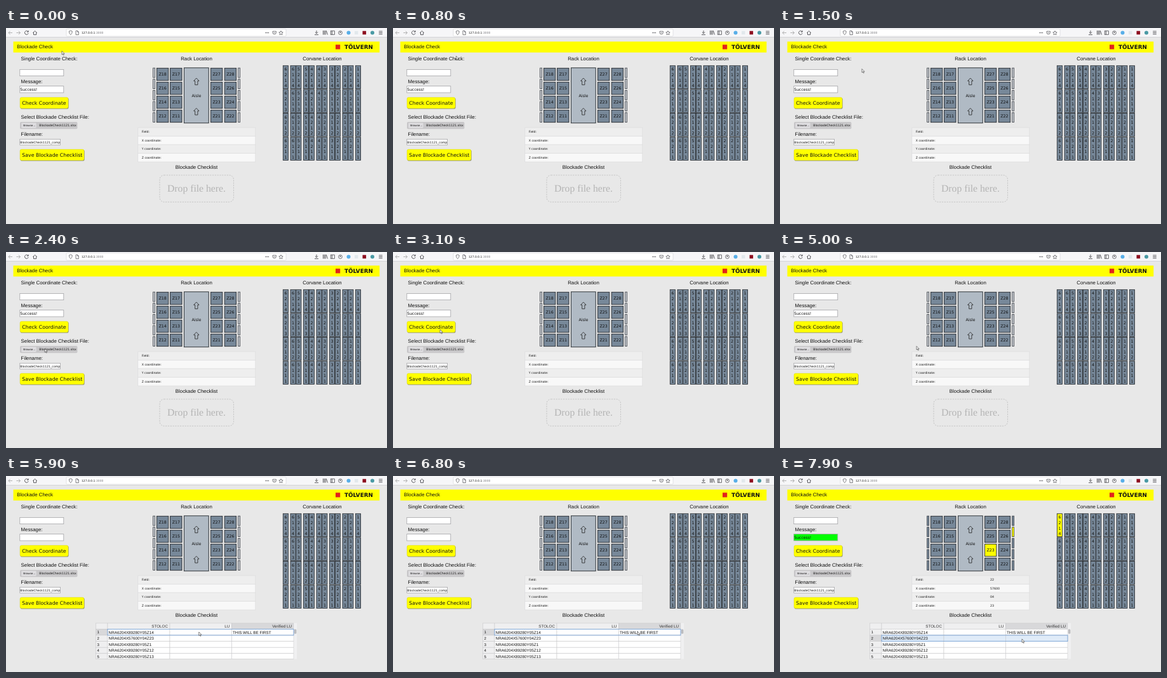
These frames come from a looping animation (600x309 px, 8000 ms). An HTML page:

```html
<!DOCTYPE html>
<html lang="en">
<head>
<meta charset="utf-8">
<title>Blockade Check</title>
<style>
html, body { margin: 0; width: 100%; height: 100%; overflow: hidden; background: #e8e8e8; }
svg { display: block; width: 600px; height: 309px; }
text { text-rendering: geometricPrecision; white-space: pre; }
.a { font-family: "Liberation Sans", Arial, sans-serif; }
.d { font-family: "DejaVu Sans", Verdana, sans-serif; }
.s { font-family: "Liberation Serif", Times, serif; }
</style>
</head>
<body>
<svg id="stage" viewBox="0 0 600 309"></svg>
<script>
const stage = document.getElementById('stage');
const LOOP = 8000, TABLE_AT = 5900, PICK_AT = 7100;
const SLATE = '#778899', YELLOW = '#ffff00', INK = '#20252a', PALE = '#c6cacf';

function add(tag, attrs, parent = stage) {
  const el = document.createElementNS('http://www.w3.org/2000/svg', tag);
  for (const k in attrs) el.setAttribute(k, attrs[k]);
  return parent.appendChild(el);
}
const group = () => add('g', {});
const rect = (x, y, width, height, fill, more = {}, parent) =>
  add('rect', { x, y, width, height, fill, ...more }, parent);
const path = (d, stroke, more = {}, parent) =>
  add('path', { d, stroke, fill: 'none', 'stroke-width': 0.9, ...more }, parent);
const dot = (cx, cy, r, fill, more = {}) => add('circle', { cx, cy, r, fill, ...more });
function text(str, x, y, size, font = 'a', more = {}, parent) {
  const el = add('text', { x, y, 'font-size': size, class: font, fill: '#111', ...more }, parent);
  el.textContent = str;
  return el;
}
const mid = { 'text-anchor': 'middle' }, end = { 'text-anchor': 'end' };
const show = (el, on) => el.setAttribute('visibility', on ? 'visible' : 'hidden');

function toolbar() {
  const c = '#4a4a4f', thin = { 'stroke-width': 0.7 };
  rect(0, 0, 600, 14.5, '#f6f6f8');
  rect(0, 14.2, 600, 0.8, '#cfcfd2');
  rect(95, 1.5, 346, 11.5, '#fff', { rx: 1.2, stroke: '#d2d2d5', 'stroke-width': 0.6 });
  path('M10 7.5H4M6.6 4.8L3.9 7.5L6.6 10.2', '#aaa');
  path('M16.4 7.5h6M19.8 4.8l2.7 2.7l-2.7 2.7', '#aaa');
  path('M34.8 5.8A2.9 2.9 0 1 0 35.2 8.2M35.2 4v2.2H33', c);
  path('M42.3 7.7L45.6 4.6L48.9 7.7M43.5 7.2v3.4h4.2V7.2', c);
  path('M99.4 5l2.4-.9l2.4.9c0 3-.8 4.5-2.4 5.6c-1.6-1.1-2.4-2.6-2.4-5.6z', c, thin);
  path('M110 4.4h2.8l1.6 1.6v4.6H110zM112.6 4.6v1.6h1.6', c, thin);
  text('127.0.0.1', 119, 9.3, 4.5, 'd');
  text(':3000', 140.4, 9.3, 4.5, 'd', { fill: '#77777c' });
  for (let i = 0; i < 3; i++) dot(409 + i * 2.2, 7.5, 0.75, c);
  path('M420 5.2h5.4v2a2.7 2.7 0 0 1-5.4 0zM421.4 6.8l1.3 1.3l1.3-1.3', c, thin);
  path('M433 4.5l1 2.1l2.2.3l-1.6 1.5l.4 2.3l-2-1.1l-2 1.1l.4-2.3l-1.6-1.5l2.2-.3z', c, thin);
  path('M489 4v4.6M486.9 6.6l2.1 2.1l2.1-2.1M486 10.6h6', c);
  path('M499.5 4v6.6M501.4 4v6.6M503.2 4v6.6M504.4 4.3l2 6.3', c);
  rect(511.3, 4.7, 6, 5.6, 'none', { stroke: c, 'stroke-width': 0.8 });
  path('M513.4 4.7v5.6', c);
  dot(526.5, 7.5, 2.9, 'none', { stroke: c, 'stroke-width': 0.8 });
  dot(526.5, 6.8, 1, c);
  dot(539.5, 7.5, 3, '#58aee8');
  rect(549, 4.8, 5.4, 5.4, '#e2e8ec');
  rect(561.5, 4.7, 5.6, 5.6, '#8e1020');
  dot(577, 7.5, 3, '#4a9aa4');
  path('M587.2 5.2h5.6M587.2 7.5h5.6M587.2 9.8h5.6', c);
}

function header() {
  rect(11.5, 21.4, 576.8, 17.2, YELLOW);
  text('Blockade Check', 17.3, 32.2, 7.85);
  rect(519, 26.3, 7.2, 7.2, '#e2231a');
  text('TÖLVERN', 533, 33, 8.8, 'd', { 'font-weight': 'bold' });
  text('Single Coordinate Check:', 23.5, 51, 7.85);
  text('Rack Location', 300, 51, 7.85, 'a', mid);
  text('Corvane Location', 498, 51, 7.85, 'a', mid);
  text('Blockade Checklist', 300, 222.4, 7.85, 'a', mid);
}

const input = (y, w, h) => rect(21.8, y, w, h, '#fff', { stroke: '#a5a5a8', 'stroke-width': 0.8 });
function button(label, y, w) {
  rect(22.6, y + 0.7, w, 17.5, '#8a8a70', { rx: 2.6 });
  rect(22, y, w, 17.4, YELLOW, { rx: 2.6, stroke: '#c9c92c', 'stroke-width': 0.4 });
  text(label, 25.3, y + 11.8, 7.8, 'd');
}

function form() {
  input(65.4, 69, 10.2);
  text('Message:', 23.5, 86.5, 7.85);
  const field = input(91.6, 69, 10.4);
  const note = text('Success!', 22.3, 99, 6.1, 'd');
  button('Check Coordinate', 109.3, 76);
  text('Select Blockade Checklist File:', 23.6, 142.8, 7.85);
  rect(22, 148, 90.5, 11.2, '#c9c8ca', { rx: 2 });
  rect(24, 149.2, 24, 8.8, '#dedde0', { rx: 1, stroke: '#bcbcbe', 'stroke-width': 0.4 });
  text('Browse...', 27.3, 155.2, 4.15, 'd');
  text('BlockadeCheck1121.xlsx', 52.2, 155.3, 4.72, 'd');
  text('Filename:', 23.6, 169.8, 7.85);
  input(175.3, 63.8, 9);
  const clip = add('clipPath', { id: 'name' });
  rect(22, 175, 63.2, 10, '#000', {}, clip);
  text('BlockadeCheck1121_comp', 22.3, 181.6, 4.7, 'd', { 'clip-path': 'url(#name)' });
  button('Save Blockade Checklist', 191.3, 101);
  return { field, note };
}

function rack() {
  const edge = { stroke: INK, 'stroke-width': 0.9 };
  const names = [[18, 17, 27, 28], [16, 15, 25, 26], [14, 13, 23, 24], [12, 11, 21, 22]];
  const bars = [], cells = {};
  for (const x of [231.6, 365.6])
    for (let i = 0; i < 5; i++)
      bars.push(rect(x, 63.1 + i * 17.6, 3, 15, PALE, { stroke: '#3c4046', 'stroke-width': 0.8 }));
  names.forEach((row, r) => row.forEach((n, c) => {
    const x = [237.4, 258.6, 322.4, 344.2][c], y = 63.3 + r * 22;
    cells[n] = rect(x, y, 18.4, 19.4, SLATE, edge);
    text('Z' + n, x + 9.2, y + 12, 6.3, 'd', mid);
  }));
  rect(280.4, 62.8, 38.8, 87, '#b0bac4', edge);
  text('Aisle', 300, 108.8, 6.3, 'd', mid);
  for (const y of [79, 126.4])
    path(`M299.8 ${y}l4.2 4.4h-2.1v6.2h-4.2v-6.2h-2.1z`, '#222', { 'stroke-width': 0.8 });
  return { bars, bar: bars[6], cell: cells[23] };
}

// Lanes stand in close pairs, with a lone one at either side.
function lanes() {
  let first;
  for (let c = 0; c < 12; c++)
    for (let g = 0; g < 4; g++) {
      const x = 436.3 + (c >> 1) * 20.5 + c % 2 * 11.7, y = 59.3 + g * 37.6;
      const box = rect(x, y, 8.1, 36.4, SLATE, { stroke: INK, 'stroke-width': 0.8 });
      first = first || box;
      [6 - (c >> 1), 2 - c % 2, 1, 4 - g].forEach((n, i) =>
        text(n, x + 4.1, y + 8 + i * 8.6, 6.3, 'd', mid));
    }
  return first;
}

function details() {
  const values = group();
  const labels = ['Field:', 'X coordinate:', 'Y coordinate:', 'Z coordinate:'];
  labels.forEach((label, i) => {
    const y = 157 + i * 13.5;
    rect(207.8, y, 185, 13.5, i % 2 ? '#f8f8f8' : '#eeeeee', { stroke: '#d9d9db', 'stroke-width': 0.6 });
    text(label, 213.8, y + 8.2, 4.65, 'd');
    text(['22', '57600', '04', '23'][i], 331, y + 8.2, 4.75, 'd', {}, values);
  });
  stage.append(values);
  return values;
}

function dropZone() {
  const g = group();
  rect(242, 232, 116.5, 42.3, 'none',
    { rx: 7, stroke: '#bcbcbc', 'stroke-width': 0.8, 'stroke-dasharray': '2.2 1.6' }, g);
  text('Drop file here.', 254, 258.4, 15.7, 's', { fill: '#b4b4b4' }, g);
  return g;
}

function sheet() {
  const g = group(), grid = { stroke: '#c9c9cb', 'stroke-width': 0.6 };
  const edges = [141.5, 160, 258, 355.3, 453];
  const codes = ['X89280Y05Z14', 'X57600Y04Z23', 'X89280Y05Z1', 'X89280Y05Z12', 'X89280Y05Z13'];
  const heads = ['', 'STOLOC', 'LU', 'Verified LU'];
  const rows = [];
  heads.forEach((h, i) => {
    rect(edges[i], 232, edges[i + 1] - edges[i], 9.4, i > 2 ? '#d8d8da' : '#efeff0', grid, g);
    text(h, edges[i + 1] - 3, 239, 6.3, 'a', { ...end, fill: '#333' }, g);
  });
  codes.forEach((code, r) => {
    const y = 241.4 + r * 9.6, cells = [];
    for (let i = 0; i < 4; i++)
      cells.push(rect(edges[i], y, edges[i + 1] - edges[i], r > 3 ? 8.6 : 9.6, '#fff', grid, g));
    text(r + 1, 145.2, y + 7, 6, 'a', mid, g);
    text('NRA6204' + code, 161.6, y + 7.1, 6.3, 'a', {}, g);
    rows.push(cells);
  });
  text('THIS WILL BE FIRST', 357, 248.5, 6.3, 'a', {}, g);
  rect(453.4, 232, 4.8, 56.4, '#f0f0f1', {}, g);
  rect(453.8, 241.4, 3.6, 7.4, '#bcbcbf', { rx: 1.5 }, g);
  const frame = rect(160, 0, 293, 9.6, 'none', { stroke: '#6f9fd8', 'stroke-width': 0.8 }, g);
  return { g, rows, frame };
}

toolbar();
header();
const { field, note } = form();
const { bars, bar, cell } = rack();
const lane = lanes();
const values = details();
const drop = dropZone();
const table = sheet();
const pointer = add('path', {
  d: 'M0 0V5.6L1.4 4.4L2.4 6.6L3.3 6.2L2.4 4.1H4.1Z',
  fill: '#fff', stroke: '#333', 'stroke-width': 0.6
});

// time, x, y of the pointer tip
const stops = [
  [0, 88, 36.3], [500, 89, 37], [1400, 129, 64.5], [1700, 129, 64.5], [2300, 61, 152.5], [2700, 61, 152.5],
  [3700, 98, 67.2], [4100, 98, 67.2], [4900, 215, 148.5], [5200, 215, 148.5], [5800, 300, 246],
  [6600, 385, 245], [6850, 385, 245], [7080, 382, 256], [8000, 381, 257]
];
function pointerAt(t) {
  const i = stops.findIndex(s => s[0] > t), a = stops[i - 1], b = stops[i];
  const u = (t - a[0]) / (b[0] - a[0]), e = u * u * (3 - 2 * u);
  return [a[1] + (b[1] - a[1]) * e, a[2] + (b[2] - a[2]) * e];
}

function draw(now) {
  const t = now % LOOP, loaded = t >= TABLE_AT, picked = t >= PICK_AT;
  const active = picked ? 1 : 0;
  show(drop, !loaded);
  show(table.g, loaded);
  show(values, picked);
  show(note, !loaded || picked);
  field.setAttribute('fill', picked ? '#00ff00' : '#fff');
  bars.forEach(b => b.setAttribute('fill', picked ? SLATE : PALE));
  bar.setAttribute('fill', picked ? YELLOW : PALE);
  for (const el of [cell, lane]) el.setAttribute('fill', picked ? YELLOW : SLATE);
  table.rows.forEach((cells, r) => cells.forEach((c, i) => {
    const on = r === active;
    c.setAttribute('fill', i ? (on && picked ? '#dfebf8' : '#fff') : (on ? '#d8d8da' : '#efeff0'));
  }));
  table.frame.setAttribute('y', 241.4 + active * 9.6);
  pointer.setAttribute('transform', `translate(${pointerAt(t)})`);
  requestAnimationFrame(() => draw(performance.now()));
}
draw(performance.now());
</script>
</body>
</html>
```
